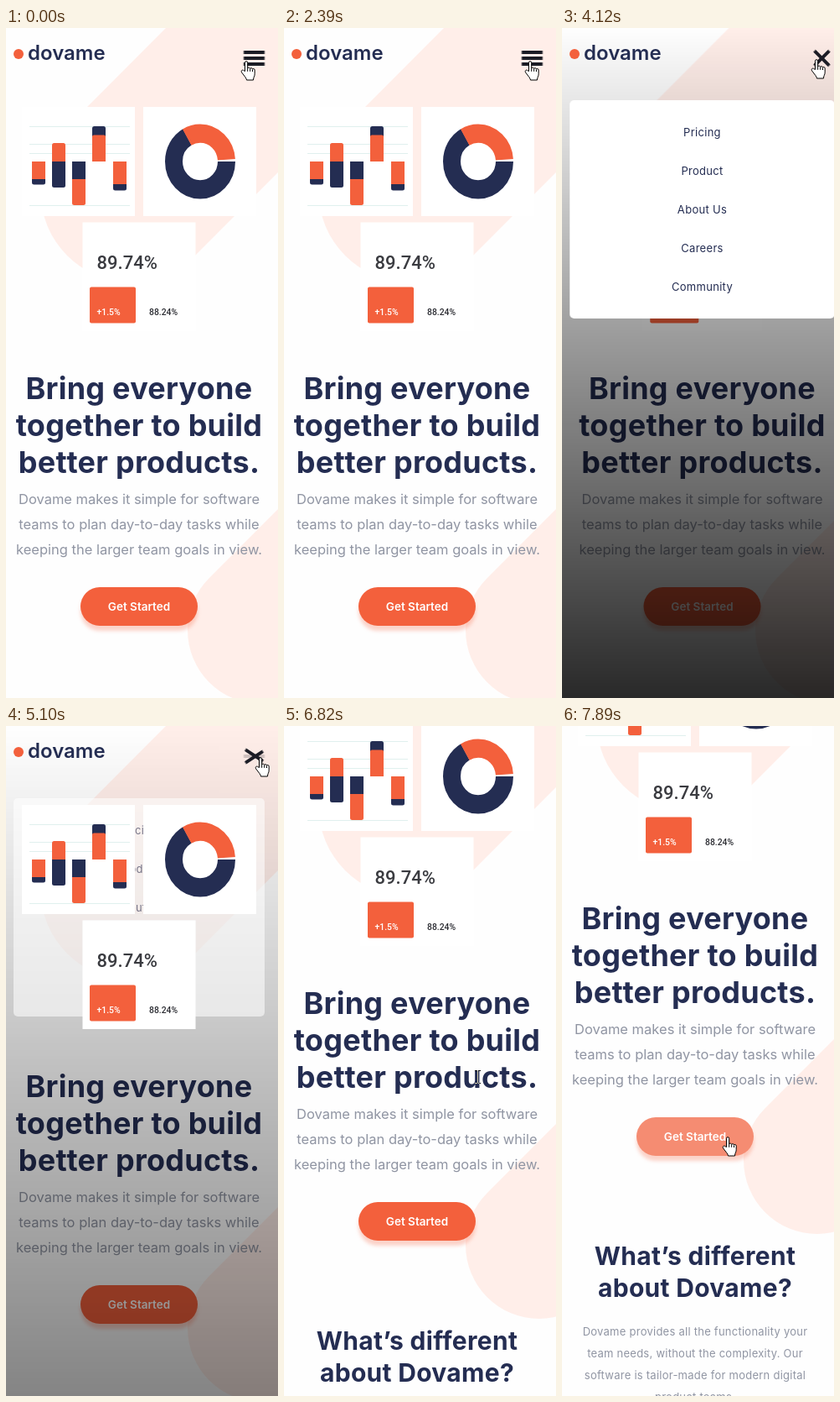
Write an HTML page that moves like this. It is 325 px wide and 798 px high and loops after 8000 ms.

```html
<!DOCTYPE html>
<html lang="en">
<head>
<meta charset="utf-8">
<title>Dovame</title>
<style>
html, body { margin: 0; width: 100%; height: 100%; overflow: hidden; background: #fefefe; }
svg { display: block; width: 100%; height: 100%; }
text {
  font-family: Inter, "Open Sans", sans-serif;
  font-optical-sizing: none;
  text-anchor: middle;
}
.navy { fill: #242d52; }
.orange { fill: #f3603c; }
.pink { fill: #ffeee9; }
.white { fill: #fff; }
.h1 { font-size: 36px; font-weight: 700; letter-spacing: .25px; }
.h2 { font-size: 30px; font-weight: 700; letter-spacing: .3px; }
.lead { font-size: 16.5px; fill: #9095a3; }
.body { font-size: 13px; letter-spacing: .25px; fill: #9095a3; }
.item { font-size: 13px; letter-spacing: .3px; }
.btn { font-size: 13.5px; font-weight: 600; }
.logo { font-size: 24px; font-weight: 600; text-anchor: start; }
.num { font-family: Roboto, "Noto Sans", sans-serif; font-weight: 500; text-anchor: start; }
.glow { filter: drop-shadow(0 6px 2px rgba(243, 96, 60, .28)); }

.scroll, .shift, .far, .wide, .fade, .raised, .bar, .mid, .press, .cur {
  animation: 8s step-end -10ms infinite;
}
.scroll { animation-name: scroll; }
.shift { animation-name: shift; }
.far { animation-name: far; }
.wide { animation-name: wide; }
.fade { animation-name: fade; opacity: 0; }
.raised { animation-name: raised; visibility: hidden; }
.bar { animation-name: bar; transform: translateY(calc(var(--s) * -7px)); }
.mid { animation-name: mid; }
.press { animation-name: press; }
.cur { visibility: hidden; stroke: #000; stroke-linejoin: round; fill: #fff; }
.hand { animation-name: move, hand; }
.arrow { animation-name: move, arrow; }
.beam { animation-name: move, beam; fill: none; stroke: #fff; mix-blend-mode: difference; }

@keyframes scroll {
  0% { transform: none; }
  83.375% { transform: translateY(-42px); }
  85.25% { transform: translateY(-99px); }
  86.875% { transform: translateY(-100px); }
  91.75% { transform: translateY(-150px); }
  93.375%, 100% { transform: translateY(-200px); }
}
/* The page widens while the menu hides the scrollbar. */
@keyframes shift {
  0%, 63.75% { transform: none; }
  36.375% { transform: translateX(8.5px); }
}
@keyframes far {
  0%, 63.75% { transform: none; }
  36.375% { transform: translateX(14px); }
}
@keyframes wide {
  0%, 63.75% { transform: none; }
  36.375% { transform: matrix(1.055, 0, 0, 1, -.25, 0); }
}
@keyframes fade {
  0%, 67.375% { opacity: 0; }
  36.375% { opacity: .5; }
  37.875% { opacity: 1; }
  63.75% { opacity: .57; }
  65.5% { opacity: .2; }
}
@keyframes raised {
  0%, 67.375% { visibility: hidden; }
  63.75% { visibility: visible; }
}
@keyframes bar {
  0%, 67.375% { transform: translateY(calc(var(--s) * -7px)); }
  36.375% { transform: translateY(calc(var(--s) * -3.5px)) rotate(calc(var(--s) * 20deg)); }
  37.875% { transform: translateY(calc(var(--s) * -.8px)) rotate(calc(var(--s) * 40deg)); }
  39.875% { transform: rotate(calc(var(--s) * 45deg)); }
  63.75% { transform: translateY(calc(var(--s) * -1px)) rotate(calc(var(--s) * 33deg)); }
  65.5% { transform: translateY(calc(var(--s) * -5.5px)) rotate(calc(var(--s) * 10deg)); }
}
@keyframes mid {
  0%, 67.375% { opacity: 1; }
  36.375% { opacity: .6; }
  37.875% { opacity: .2; }
  39.875% { opacity: 0; }
  63.75% { opacity: .2; }
  65.5% { opacity: .8; }
}
@keyframes press {
  0% { fill: #f3603c; }
  96.625% { fill: #f47658; }
  98.625%, 100% { fill: #f58c72; }
}
@keyframes move {
  0% { transform: translate(280px, 39px); }
  5.375% { transform: translate(266px, 42px); }
  7% { transform: translate(252px, 44px); }
  8.75% { transform: translate(238px, 49px); }
  10.375% { transform: translate(222px, 54px); }
  11.875% { transform: translate(209px, 60px); }
  13.75% { transform: translate(207px, 65px); }
  15.25% { transform: translate(202px, 72px); }
  16.875% { transform: translate(196px, 80px); }
  18.375% { transform: translate(191px, 90px); }
  20.25% { transform: translate(188px, 114px); }
  22% { transform: translate(190px, 121px); }
  23.5% { transform: translate(230px, 108px); }
  25% { transform: translate(265px, 85px); }
  26.875% { transform: translate(276px, 70px); }
  28.375% { transform: translate(285px, 46px); }
  29.875% { transform: translate(287px, 39px); }
  36.375% { transform: translate(290px, 38px); }
  37.875% { transform: translate(293px, 37px); }
  49.875% { transform: translate(295px, 37px); }
  51.5% { transform: translate(297px, 37px); }
  67.375% { transform: translate(285px, 61px); }
  69.25% { transform: translate(274px, 140px); }
  70.875% { transform: translate(252px, 270px); }
  72.375% { transform: translate(233px, 387px); }
  74.25% { transform: translate(228px, 409px); }
  79.625% { transform: translate(228px, 410px); }
  90% { transform: translate(228px, 414px); }
  91.75% { transform: translate(226px, 419px); }
  93.375% { transform: translate(223px, 423px); }
  95.125% { transform: translate(212px, 452px); }
  96.625% { transform: translate(191px, 488px); }
  98.625%, 100% { transform: translate(191px, 489px); }
}
@keyframes hand {
  0%, 28.375%, 96.625%, 100% { visibility: visible; }
  5.375%, 67.375% { visibility: hidden; }
}
@keyframes arrow {
  0%, 28.375%, 74.25%, 96.625% { visibility: hidden; }
  5.375%, 67.375%, 95.125% { visibility: visible; }
}
@keyframes beam {
  0%, 95.125% { visibility: hidden; }
  74.25% { visibility: visible; }
}
</style>
</head>
<body>
<svg viewBox="0 0 325 798">
  <defs>
    <linearGradient id="shade" x2="0" y2="1">
      <stop stop-color="#000" stop-opacity="0"/>
      <stop offset="1" stop-color="#000" stop-opacity=".84"/>
    </linearGradient>
    <g id="art">
      <path class="white" d="M19 94h135v130H19zM164 94h135v130H164zM91.500 231.500h135V361h-135z"/>
      <path d="M28 117.500h120M28 138.500h120M28 149.500h120M28 211.500h120" stroke="#e0f0ee"/>
      <g class="navy">
        <rect x="31" y="160" width="16" height="26.500" rx="2.500"/>
        <path d="M55 159h16v28.500a2.500 2.500 0 0 1-2.500 2.500h-11a2.500 2.500 0 0 1-2.500-2.500z"/>
        <path d="M79 159h16v22H79z"/>
        <rect x="103" y="117" width="16" height="20" rx="2.500"/>
        <rect x="128" y="165" width="16" height="28.500" rx="2.500"/>
      </g>
      <g class="orange">
        <path d="M31 159h16v21H31zM103 159v-29.500a2 2 0 0 1 2-2h12a2 2 0 0 1 2 2V159zM128 159h16v27h-16z"/>
        <path d="M55 159v-19.500a2.500 2.500 0 0 1 2.500-2.500h11a2.500 2.500 0 0 1 2.500 2.500V159z"/>
        <path d="M79 180h16v28.500a2.500 2.500 0 0 1-2.500 2.500h-11a2.500 2.500 0 0 1-2.500-2.500z"/>
        <rect x="100" y="308.500" width="55" height="43" rx="2"/>
      </g>
      <g transform="translate(232 159) scale(1 1.06)" fill="none" stroke-width="21">
        <circle r="31.500" pathLength="360" stroke="#242d52" stroke-dasharray="240.500 119.500"/>
        <circle r="31.500" pathLength="360" stroke="#f3603c" stroke-dasharray="116 244" stroke-dashoffset="-240"/>
      </g>
      <text class="num" x="108.500" y="287" font-size="22" fill="#3a3b40">89.74%</text>
      <text class="num white" x="108.500" y="342" font-size="10.400">+1.5%</text>
      <text class="num" x="171" y="342" font-size="10.400" fill="#2c2d33">88.24%</text>
    </g>
  </defs>

  <rect width="325" height="798" fill="#fefefe"/>

  <g class="scroll">
    <!-- A radius just under half the chord makes an exact semicircle. -->
    <path class="pink shift" d="M191 0L73 118A107 107 0 0 0 226 271L497 0z"/>
    <path class="pink far" d="M325 573L242.700 655.300A87 87 0 0 0 366.700 779.300L420 726V478z"/>
    <use class="wide" href="#art"/>
    <g class="shift">
      <g class="h1 navy">
        <text x="159" y="442">Bring everyone</text>
        <text x="159" y="486">together to build</text>
        <text x="159" y="530">better products.</text>
      </g>
      <g class="lead">
        <text x="159" y="567">Dovame makes it simple for software</text>
        <text x="159" y="597">teams to plan day-to-day tasks while</text>
        <text x="159" y="627">keeping the larger team goals in view.</text>
      </g>
      <g class="glow"><rect class="press" x="89" y="666" width="140" height="46" rx="23"/></g>
      <text class="btn white" x="159" y="694">Get Started</text>
      <g class="h2 navy">
        <text x="159" y="842">What’s different</text>
        <text x="159" y="880">about Dovame?</text>
      </g>
      <g class="body">
        <text x="159" y="926">Dovame provides all the functionality your</text>
        <text x="159" y="952">team needs, without the complexity. Our</text>
        <text x="159" y="978">software is tailor-made for modern digital</text>
        <text x="159" y="1004">product teams.</text>
      </g>
    </g>
  </g>

  <rect class="fade" width="325" height="798" fill="url(#shade)"/>
  <g class="fade">
    <rect class="wide white" x="9" y="86" width="300" height="260" rx="5"/>
    <g class="shift item navy">
      <text x="159" y="129">Pricing</text>
      <text x="159" y="175">Product</text>
      <text x="159" y="221">About Us</text>
      <text x="159" y="267">Careers</text>
      <text x="159" y="313">Community</text>
    </g>
  </g>
  <use class="raised" href="#art"/>

  <g class="scroll">
    <circle class="orange" cx="15" cy="31" r="6"/>
    <text class="logo navy" x="26" y="38">dovame</text>
    <g class="far">
      <g transform="translate(296.500 36)" fill="#1b1c25">
        <rect class="bar" style="--s:1" x="-12.500" y="-2" width="25" height="4"/>
        <rect class="mid" x="-12.500" y="-2" width="25" height="4"/>
        <rect class="bar" style="--s:-1" x="-12.500" y="-2" width="25" height="4"/>
      </g>
    </g>
  </g>

  <path class="cur hand" d="M5.500 12.500V2.300a1.600 1.600 0 0 1 3.200 0v7c0-1.600 3-1.600 3 .3c.3-1.400 2.800-1.200 2.800.5c.5-1 2.700-.8 2.700 1v4.700c0 3-1.700 4-1.700 7.200H7.500c0-2-2.500-4.500-5.800-9c-1.600-2.400 1.200-3.800 2.500-2.200zM8.700 9.300v3.500M11.700 9.800v3M14.500 10.500v2.500"/>
  <path class="cur arrow" d="M.5.5v16l3.700-3.500 2.600 5.600 2.400-1-2.600-5.500h5z"/>
  <path class="cur beam" d="M0 .5h3M4 .5h3M3.500 1v14M0 15.500h3M4 15.500h3"/>
</svg>
</body>
</html>
```
